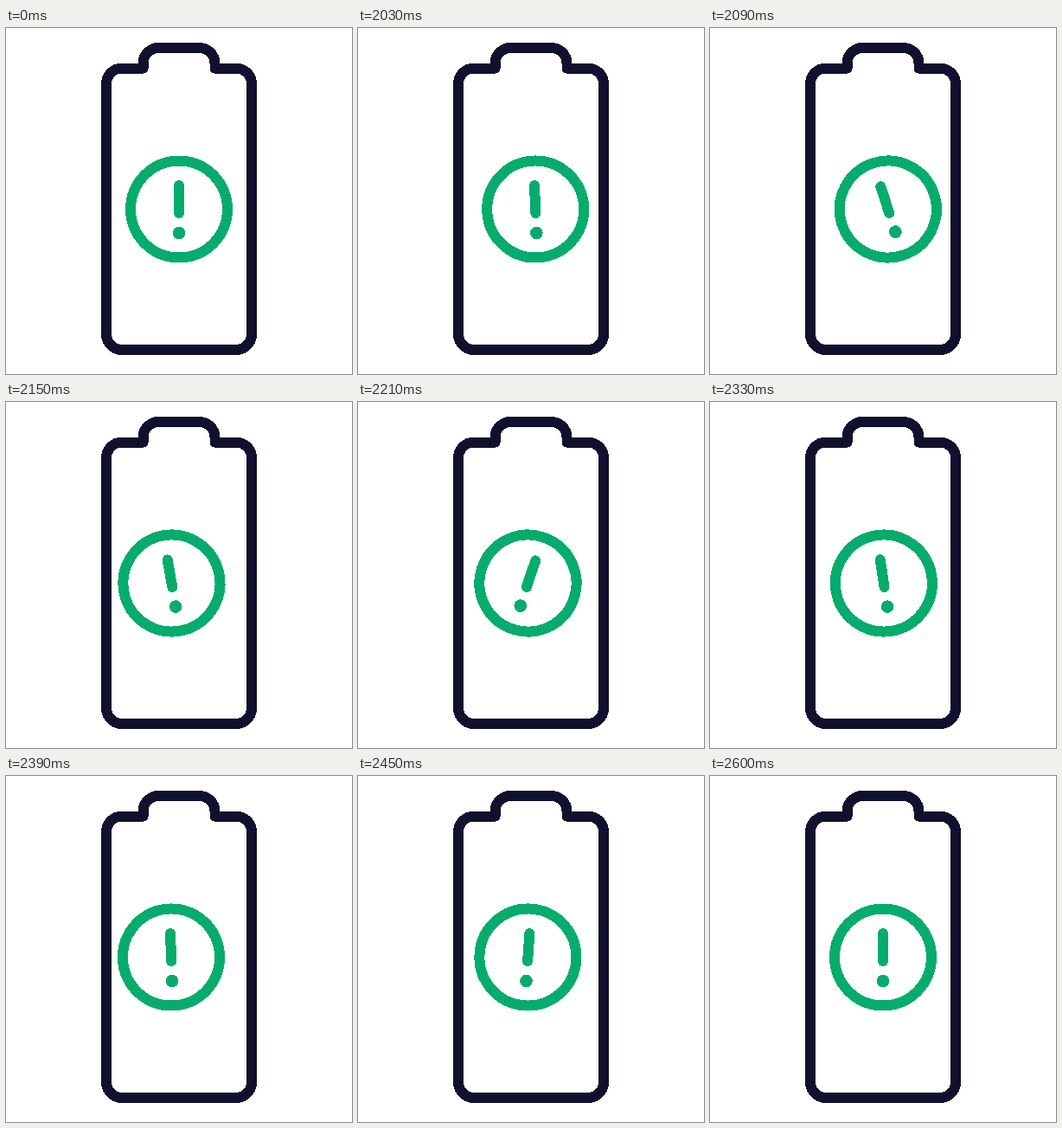
Write an HTML page that moves like this. It is 400 px wide and 400 px high and loops after 2.63 s.

```html
<!DOCTYPE html>
<html lang="en">
<head>
<meta charset="utf-8">
<title>Battery alert</title>
<style>
  html, body { margin: 0; width: 100%; height: 100%; overflow: hidden; background: #fff; }
  svg { display: block; width: 100vw; height: 100vh; shape-rendering: crispEdges; }
  .line { fill: none; stroke-width: 12; stroke-linecap: round; stroke-linejoin: round; }
  .case { stroke: #10112e; }
  .alert { stroke: #05ac6d; }
  .dot { fill: #05ac6d; }
</style>
</head>
<body>
<svg viewBox="0 0 400 400">
  <path class="line case" d="M158.5 46.6H134a18 18 0 0 0-18 18V354a18 18 0 0 0 18 18H266a18 18 0 0 0 18-18V64.6a18 18 0 0 0-18-18H241.5V41a18 18 0 0 0-18-18H176.5a18 18 0 0 0-18 18Z"/>
  <g id="badge">
    <circle class="line alert" r="56"/>
    <path class="line alert" d="M0-27.5V4.5"/>
    <circle class="dot" cy="27.5" r="7.3"/>
  </g>
</svg>
<script>
  const LOOP = 2630, START = 2030, STEP = 30;
  const BEAT = 3.7, SWINGS = 4; // beat length in steps

  const badge = document.getElementById('badge');
  const ease = u => u * u * u * (10 + u * (6 * u - 15));

  // Alternating peaks one beat apart, at rest before the first and after the last
  function swing(k, first, size) {
    const peak = i => i < 0 || i >= SWINGS ? 0 : (i % 2 ? -1 : 1) * size(i);
    const beats = (k - first) / BEAT;
    const i = Math.floor(beats);
    const u = i < 0 ? k / first : beats - i;
    return peak(i) + (peak(i + 1) - peak(i)) * ease(u);
  }

  const shift = k => swing(k, BEAT / 2, () => 9);
  const tilt = k => swing(k, BEAT, i => -19 * Math.min(1, 0.46 ** (i - 1)));

  function draw(time) {
    const t = time % LOOP;
    const k = t < START ? 0 : Math.floor((t - START) / STEP) + 1;
    badge.setAttribute('transform', `translate(${200 + shift(k)} 209.5) rotate(${tilt(k)})`);
  }

  const begin = performance.now();
  function tick() {
    draw(performance.now() - begin);
    requestAnimationFrame(tick);
  }
  tick();
</script>
</body>
</html>
```
